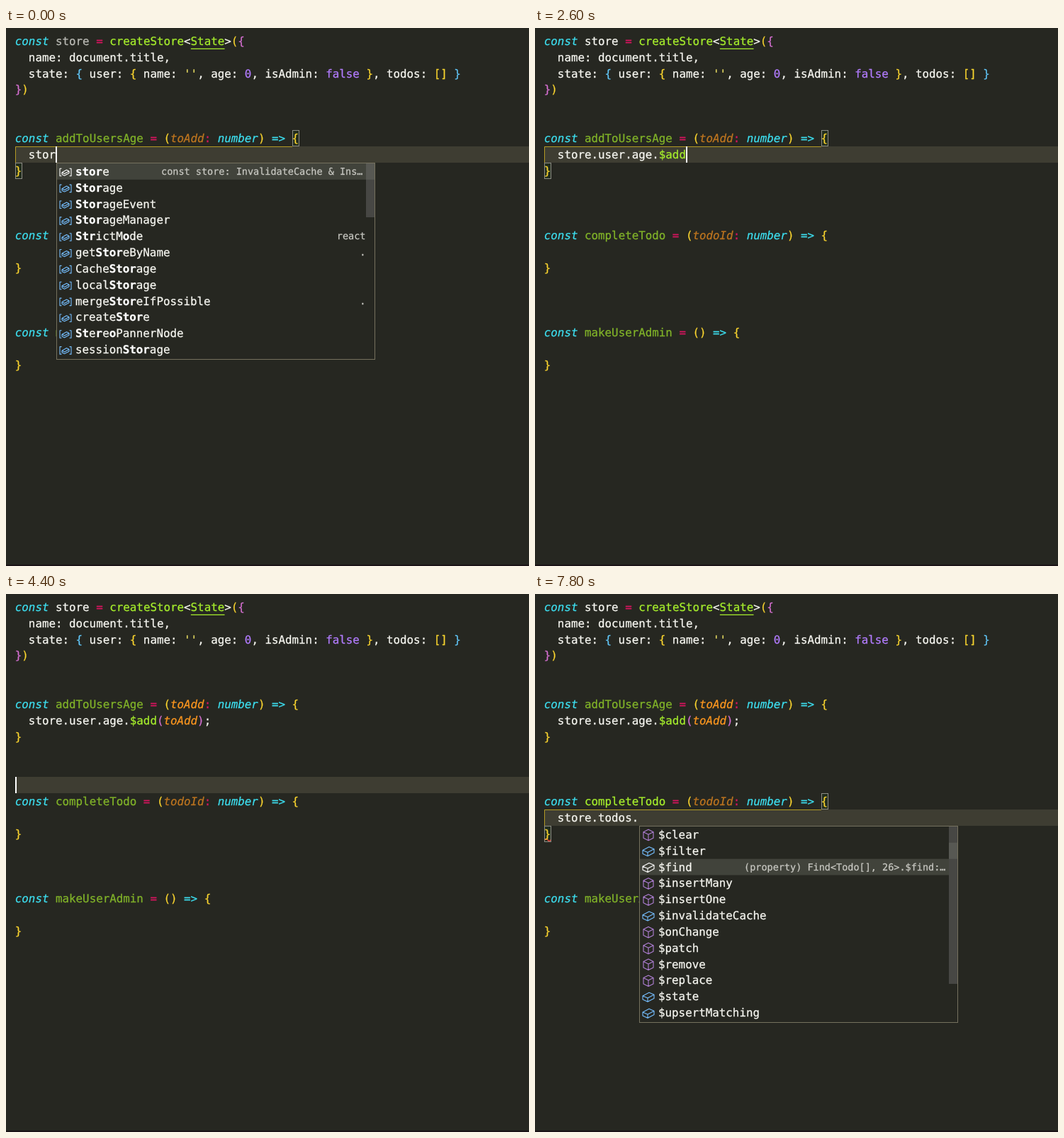
These frames come from a looping animation (738 by 759 pixels, 8 s). An HTML page:

```html
<!DOCTYPE html>
<html lang="en">
<head>
<meta charset="utf-8">
<title>Store autocomplete</title>
<style>
html, body { margin: 0; width: 100%; height: 100%; overflow: hidden; background: #262721; }
svg { display: block; width: 100%; height: 100%; }
text {
  font: 15.846px "DejaVu Sans Mono", "Liberation Mono", monospace;
  color: #f8f8f2; white-space: pre; text-rendering: geometricPrecision;
}
text, tspan { fill: currentColor; stroke: currentColor; stroke-width: .25; }
.k { color: #3ddff0; font-style: italic; }
.c { color: #3ddff0; }
.g { color: #a6ee2c; }
.p { color: #d9145f; }
.o { color: #fd971f; font-style: italic; }
.u { color: #b27cff; }
.y { color: #fbd52f; }
.m { color: #d670d2; }
.b { color: #62c8fa; }
.s { color: #e8dc62; }
.dim { fill-opacity: .68; stroke-opacity: .68; }
.hit { font-weight: bold; color: #fff; }
.detail { font-size: 13.5px; color: #c8c8c2; text-anchor: end; }
.doc { font: 15.63px Inter, "Liberation Sans", sans-serif; color: #d6d6d0; }
.sig { color: #d8d8d2; }
.icon { fill: none; stroke-width: 1.1; stroke-linejoin: round; }
</style>
</head>
<body>
<svg id="stage" viewBox="0 0 738 759" preserveAspectRatio="none"></svg>
<script>
const X0 = 12.8, CW = 9.54, LH = 22.85, STEP = 200, LOOP = 8000;
const stage = document.getElementById('stage');
const colX = c => X0 + c * CW;
const rowY = r => 7.1 + r * LH;
const rowTop = r => Math.round(rowY(r));
const esc = s => s.replace(/&/g, '&amp;').replace(/</g, '&lt;');
const span = (cls, s) => `<tspan class="${cls}">${esc(s)}</tspan>`;
const text = (x, y, body, cls = '') => `<text x="${x}" y="${y}" class="${cls}">${body}</text>`;
const rect = (x, y, w, h, fill, stroke = 'none') =>
  `<rect x="${x}" y="${y}" width="${w}" height="${h}" fill="${fill}" stroke="${stroke}"/>`;
const path = (d, stroke, extra = '') => `<path d="${d}" fill="none" stroke="${stroke}" ${extra}/>`;

// Code lines are flat lists: class, text, class, text ...
function line(row, ...parts) {
  let body = '';
  for (let i = 0; i < parts.length; i += 2) body += span(parts[i], parts[i + 1]);
  return text(X0, rowY(row) + 16.8, body);
}

const icons = {
  v: ['#75beff', 'M-5.5-4.5H-8V6H-5.5M5.5-4.5H8V6H5.5M-5 1L1.5-2.6 5-.8V2L-1.5 5.4-5 3.6ZM-5 1L-1.5 2.8 5-.8'],
  m: ['#b180d7', 'M0-7.5L7-4V4.5L0 8-7 4.5V-4ZM-7-4L0-.5 7-4M0-.5V8'],
  f: ['#75beff', 'M-8-1.2L1-6 8-3V2.3L-1 7-8 3.8ZM-8-1.2L-1 1.8 8-3M-1 1.8V7'],
  k: ['#d0d0ca', 'M-8-6H0V-3.5H-8ZM3-4.5H8M-8 0H-3M0 0H8M-8 3.5H2M5 3.5H8M-8 7H-4M-1 7H8'],
  s: ['#d0d0ca', 'M-7 6V-7H7V6M-7 7.5h1.5m2 0h1.5m2 0h1.5m2 0h1.5m2 0h1.5']
};

// "kind label|detail when selected|detail always"
const list = s => s.trim().split(/\s*\n\s*/).map(row => {
  const [name, own = '', always = ''] = row.slice(2).split('|');
  return { kind: row[0], name, own, always };
});
const common = `f $deepMerge|(property) DeepMerge<{ name: string…
  m $insert|(method) Insert.$insert(): Future<…
  f $invalidateCache|(property) InvalidateCache.$invali…
  m $onChange|(method) OnChange.$onChange(): Cha…
  m $patch|(method) Patch.$patch(): Future<an…
  m $remove|(method) Remove.$remove(): Future<…
  m $replace|(method) Replace.$replace(): Futur…
  f $state|(property) Read.$state: DeepReadon…
`;
const storeRow = 'v store|const store: InvalidateCache & Ins…\n';
const menus = {
  stor: { bar: 76, items: list(storeRow + `v Storage
    v StorageEvent
    v StorageManager
    v StrictMode||react
    v getStoreByName||.
    v CacheStorage
    v localStorage
    v mergeStoreIfPossible||.
    v createStore
    v StereoPannerNode
    v sessionStorage`) },
  store: { bar: 97, items: list(storeRow + `v StorageEvent
    v Storage
    v StorageManager
    v getStoreByName||.
    v StrictMode||react
    v mergeStoreIfPossible||.
    v createStore
    v IDBObjectStore
    v CacheStorage
    v localStorage
    v StereoPannerNode`) },
  root: { items: list(common + `f todos|(property) todos: UpdatableArray<T…
    f user|(property) user: UpdatableObject<{…`) },
  user: { items: list(common + `f age|(property) age: UpdatablePrimitive…
    f isAdmin
    f name`) },
  age: { items: list(`m $add|(method) Add.$add(toAdd: any, opti…
    f $invalidateCache|(property) InvalidateCache.$invali…
    m $onChange
    m $replace
    f $state
    m $subtract`) },
  to: { bar: 95, items: list(`v toAdd|(parameter) toAdd: number
    m toString
    v toolbar
    v top
    v toIsoStringInCurrentTz||./write-async
    v Touch
    v TouchEvent
    v TouchList
    k throw
    s throw||Throw Exception
    v addToUsersAge
    k typeof`) },
  todos: { bar: 222, items: list(`m $clear|(method) Clear.$clear(): void (+1 …
    f $filter|(property) Filter<Todo[], 26>.$fil…
    f $find|(property) Find<Todo[], 26>.$find:…
    m $insertMany
    m $insertOne
    f $invalidateCache
    m $onChange
    m $patch
    m $remove
    m $replace
    f $state
    f $upsertMatching`) }
};

// Indices of the letters that the query hits: run, swapped pair, then loose.
function hits(name, query) {
  const low = name.toLowerCase(), at = low.indexOf(query);
  if (at >= 0) return [...query].map((_, i) => at + i);
  const loose = q => {
    const out = [];
    let from = 0;
    for (const ch of q) {
      let i = low[from] === ch ? from : name.indexOf(ch.toUpperCase(), from);
      if (i < 0) i = low.indexOf(ch, from);
      if (i < 0) return null;
      out.push(i);
      from = i + 1;
    }
    return out;
  };
  const swapped = query.replace(/^(..)(.)(.)/, '$1$3$2');
  return (swapped !== query && loose(swapped)) || loose(query) || [];
}

function drawMenu(s, x, y) {
  const menu = menus[s.menu], q = s.query;
  const items = s.only ? menu.items.filter(it => it.name.startsWith(q)) : menu.items;
  const bar = s.only ? 0 : menu.bar, h = Math.round(items.length * LH);
  let out = rect(x + .5, y + .5, 449, h + 3, '#262721', '#75715e');
  const selY = y + 1 + s.sel * LH;
  out += rect(x + 1, selY, bar ? 436 : 448, LH, '#41433b');
  if (bar) {
    const glow = s.glow ?? s.sel;
    out += rect(x + 437, y + 1 + glow * LH, 12, LH, '#41433b');
    out += rect(x + 437, y + 1, 12, bar, 'rgba(121,121,121,.4)');
  }
  items.forEach((it, i) => {
    const on = i === s.sel, base = y + 17.8 + i * LH, [color, d] = icons[it.kind];
    const marked = new Set(hits(it.name, q));
    const label = [...it.name].map((ch, n) => span(marked.has(n) ? 'hit' : '', ch)).join('');
    const detail = it.always || (on ? it.own : '');
    out += `<path class="icon" d="${d}" stroke="${on ? '#fff' : color}" transform="translate(${x + 13} ${base - 5})"/>`;
    out += text(x + 27, base, label);
    if (detail) out += text(x + (detail.endsWith('…') ? 432.5 : 436.5), base - .8, esc(detail), 'detail');
  });
  return out;
}

function drawTip(x) {
  return rect(x + .5, 68.5, 520, 100, '#41433b', '#75715e') +
    path(`M${x} 125.5H738`, '#65655a') +
    text(x + 7, 91.5, esc('$add(') + span('hit', 'toAdd: any') + esc(', options: UpdateOptions<any>): void |'), 'sig') +
    text(x + 7, 114.2, esc('Future<unknown>'), 'sig') +
    text(x + 7, 152.6, 'Add the supplied number onto the selected number.', 'doc');
}

const tokens = s => s.split(/(\$\w+|[()]|\btoAdd)/).flatMap(t =>
  [t[0] === '$' ? 'g' : /^[()]$/.test(t) ? 'm' : t === 'toAdd' ? 'o' : '', t]);

const arrow = (row, name, lit, arg, used) => line(row,
  'k', 'const ', lit ? 'g' : 'g dim', name, 'p', ' = ', 'y', '(',
  used ? 'o' : 'o dim', arg, 'p', arg && ':', 'k', arg && ' number', 'y', ')', 'c', ' => ', 'y', '{') +
  line(row + 2, 'y', '}');

const box = (c, r) => rect(Math.round(colX(c)) + .5, rowTop(r) + .5, 9, 22, 'rgba(0,100,0,.1)', '#8c8c84');

function draw(s) {
  const code = { 7: '  ' + s.a, 13: '  ' + s.b };
  const here = code[s.row] ?? '';
  const mark = here.indexOf('^');
  const col = mark < 0 ? here.length : mark;
  const bare = here.replace('^', '');
  const x = colX(col), left = Math.round(x + .5), broken = bare.endsWith('.');
  const atParen = mark > 0 || bare.endsWith(')');

  let out = rect(0, 757, 738, 2, '#1b1417');
  out += rect(13, rowTop(s.row), 725, 23, '#3e3d32');
  const open = s.row === 8 ? 6 : s.row === 7 || s.row === 13 ? s.row - 1 : 0;
  if (open && !atParen) {
    const y = rowTop(open + 1);
    out += path(`M13.5 ${y + 23}V${y + .5}H404`, '#b39a24') + box(41, open) + box(0, open + 2);
    if (broken) out += path(`M14 ${y + 43}q2-3 4 0t4 0`, '#f0443c', 'stroke-width="1.4"');
  } else if (atParen) {
    out += box(bare.indexOf('('), s.row) + box(bare.indexOf(')'), s.row);
  }

  out += line(0, 'k', 'const ', s.idle ? 'dim' : '', 'store', 'p', ' = ', 'g', 'createStore', '', '<', 'g', 'State', '', '>', 'y', '(', 'm', '{');
  out += path(`M${colX(26)} 29.3H${colX(31)}`, '#a6ee2c', 'stroke-width="1.2"');
  out += line(1, '', '  name: document.title,');
  out += line(2, '', '  state: ', 'b', '{', '', ' user: ', 'y', '{', '', ' name: ', 's', "''", '', ', age: ', 'u', '0',
    '', ', isAdmin: ', 'u', 'false', 'y', ' }', '', ', todos: ', 'y', '[]', 'b', ' }');
  out += line(3, 'm', '}', 'y', ')');
  out += arrow(6, 'addToUsersAge', s.row === 7 && broken, 'toAdd', s.a.includes('(toAdd'));
  out += arrow(12, 'completeTodo', s.row === 13 && broken, 'todoId', false);
  out += arrow(18, 'makeUserAdmin', false, '', false);
  for (const r of [7, 13]) out += line(r, ...tokens(code[r].replace('^', '')));

  if (s.tip) out += drawTip(left);
  if (s.menu) out += drawMenu(s, left, rowTop(s.row + 1));
  if (s.caret) out += rect(Math.round(x), rowTop(s.row), 2, 23, '#fff');
  return out;
}

const typed = (key, value, menu, query = '', sel = 0, only = false) => ({ [key]: value, menu, query, sel, only });
const age = 'store.user.age';

// Each entry changes the state from its step on.
const beats = {
  0: { a: 'stor', b: '', row: 7, menu: 'stor', query: 'stor', sel: 0, caret: true, idle: true },
  1: typed('a', 'store', 'store', 'store'),
  2: { ...typed('a', 'store.', 'root'), idle: false },
  3: typed('a', 'store.u', 'root', 'u', 0, true),
  4: typed('a', 'store.us', 'root', 'us', 0, true),
  5: typed('a', 'store.user', 'root', 'user', 0, true),
  6: typed('a', 'store.user.', 'user'),
  7: { sel: 3 },
  8: { sel: 6 },
  9: { sel: 8 },
  10: typed('a', age, ''),
  11: typed('a', age + '.', 'age'),
  12: typed('a', age + '.$a', 'age', '$a', 0, true),
  13: typed('a', age + '.$add', ''),
  14: { a: age + '.$add(^)', tip: true },
  15: typed('a', age + '.$add(t^)', 'to', 't'),
  16: typed('a', age + '.$add(to^)', 'to', 'to'),
  17: typed('a', age + '.$add(toAdd^)', ''),
  18: { a: age + '.$add(toAdd)' },
  19: { a: age + '.$add(toAdd);', tip: false },
  20: { row: 8 },
  21: { row: 10 },
  22: { row: 11 },
  23: { row: 12 },
  24: { row: 13 },
  25: typed('b', 's', 'store', 's'),
  26: typed('b', 'stor', 'stor', 'stor'),
  27: typed('b', 'store', 'store', 'store'),
  28: typed('b', 'store.', 'root'),
  29: typed('b', 'store.t', 'root', 't', 0, true),
  30: typed('b', 'store.to', 'root', 'to', 0, true),
  31: typed('b', 'store.todo', 'root', 'todo', 0, true),
  32: typed('b', 'store.todos', 'root', 'todos', 0, true),
  33: typed('b', 'store.todos.', 'todos'),
  34: { caret: false },
  35: { caret: true },
  37: { sel: 1 },
  38: { sel: 2, glow: 1 },
  39: { caret: false }
};

let state = {};
const scenes = Array.from({ length: LOOP / STEP }, (_, i) => draw(state = { ...state, ...beats[i] }));

let shown = -1;
function tick() {
  const step = Math.floor(performance.now() % LOOP / STEP);
  if (step !== shown) stage.innerHTML = scenes[shown = step];
  requestAnimationFrame(tick);
}
tick();
</script>
</body>
</html>
```
